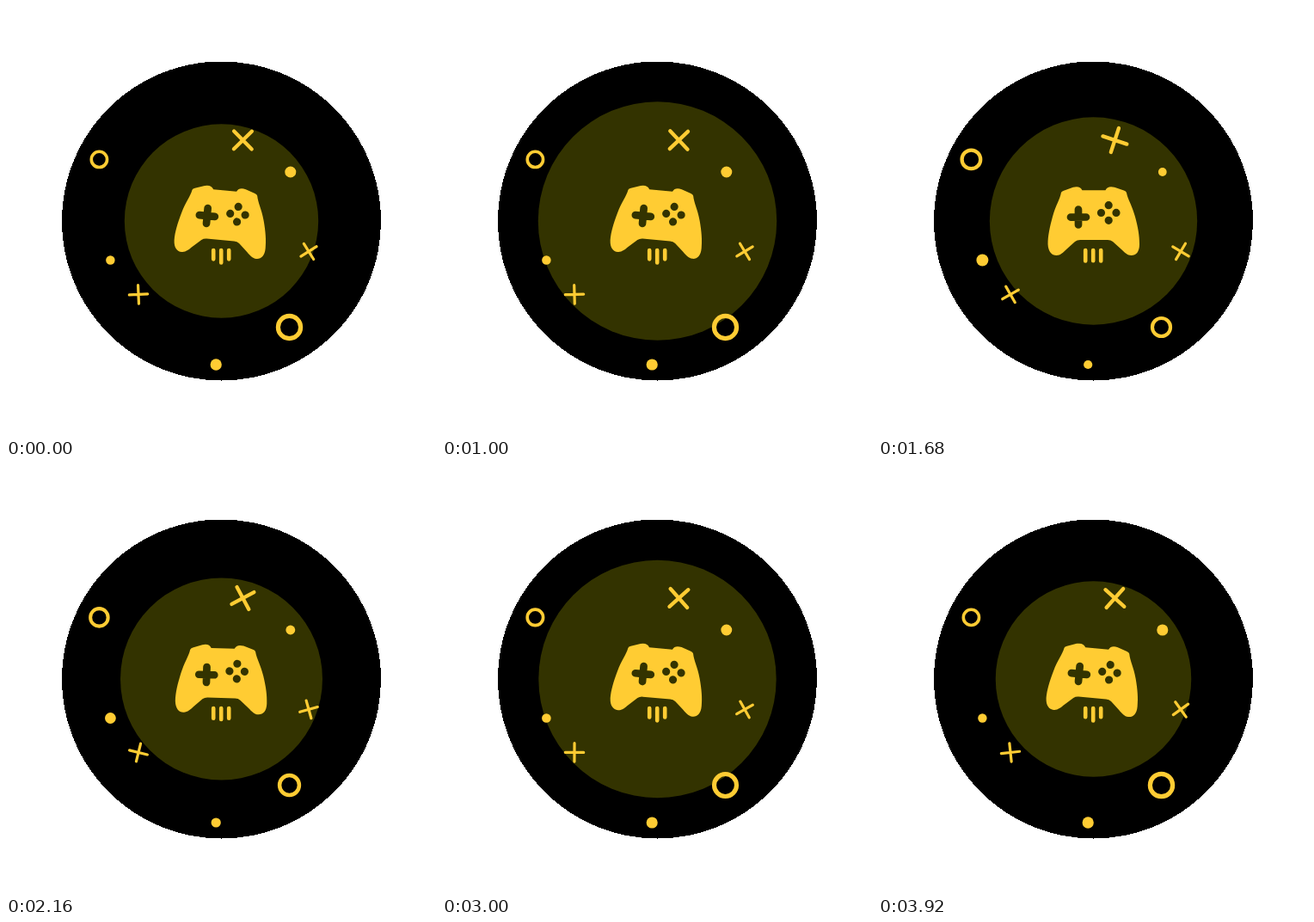
An HTML page for the animation above (3960 ms loop, 500 px wide and 500 px high).

```html
<!DOCTYPE html>
<html lang="en">
<head>
<meta charset="utf-8">
<title>Game controller</title>
<style>
  html, body { margin: 0; width: 100%; height: 100%; overflow: hidden; background: #fff; }
  svg { display: block; width: 100vw; height: 100vh; }
</style>
</head>
<body>
<svg viewBox="0 0 500 500" fill="#fc3" stroke-linecap="round">
  <circle cx="250.5" cy="250" r="185.5" fill="#000" shape-rendering="crispEdges"/>
  <circle id="pulse" cx="250.5" cy="250" r="112.7" fill="#330"/>
  <g id="pad">
    <path d="M213 217Q213.5 215.5 216 214.6L227 210.8Q235 208.8 237.5 214.3H264.500Q267 208.8 275 210.8
      L286 214.6Q288.5 215.5 289 217C290.5 225 295.5 232 299 245C302.5 258 304 267 304 277C304 286 300 290 294.5 290
      C290 290 286.5 286.5 283 283L273 274Q270.5 272 267 272H235Q231.5 272 229 274L219 283
      C215.5 286.5 212 290 207.5 290C202 290 198 286 197.5 277C197.500 267 199.500 258 203 245C206.500 232 211.500 225 213 217Z"/>
    <path d="M224 245.500h18M233 236.500v18" stroke="#330" stroke-width="8.700"/>
    <g fill="#330">
      <circle cx="268.200" cy="231.700" r="4.600"/>
      <circle cx="259.500" cy="240.500" r="4.600"/>
      <circle cx="277" cy="240.500" r="4.600"/>
      <circle cx="268.200" cy="249.300" r="4.600"/>
    </g>
  </g>
  <path id="stripes" stroke="#fc3" stroke-width="4.600"/>
  <g id="parts" stroke="#fc3"></g>
</svg>
<script>
const LOOP = 3960, BEAT = LOOP / 4, STEP = 40, LEAD = 30;
const $ = id => document.getElementById(id);

function add(tag, attrs) {
  const el = document.createElementNS('http://www.w3.org/2000/svg', tag);
  for (const key in attrs) el.setAttribute(key, attrs[key]);
  return $('parts').appendChild(el);
}

// x, y, mean outer radius, swing, ring or dot
const rounds = [
  [108.4, 178.4, 12.7, -1.8, true],
  [329.5, 373.5, 13, 2.75, true],
  [330.8, 193, 5.1, 1.45, false],
  [244.2, 417, 5.3, 1.35, false],
  [121.4, 295.5, 6.75, -1.55, false]
].map(([x, y, mean, swing, ring]) => ({
  x, y, mean, swing,
  el: add('circle', ring
    ? { r: 0.835, fill: 'none', 'stroke-width': 0.33 }
    : { r: 1, stroke: 'none' })
}));

// x, y, arm length, line width, starting angle
const crosses = [
  [275.4, 156, 14.7, 4.3, 45.5],
  [352, 285.4, 10.7, 3.2, -32],
  [154, 335.4, 10.7, 3.2, -2.5]
].map(([x, y, arm, width, angle]) => ({
  x, y, angle,
  el: add('path', { d: `M${-arm} 0H${arm}M0 ${-arm}V${arm}`, 'stroke-width': width })
}));

function draw(t) {
  const wave = Math.cos((t + LEAD) / BEAT * 2 * Math.PI);
  const grow = 1 - Math.abs(1 - t / BEAT % 2);
  $('pulse').setAttribute('r', 112.7 + 26.3 * grow);
  $('pad').setAttribute('transform', `rotate(${0.6 + 4.7 * wave} 250 254)`);

  const side = 296.2 - 1.9 * wave, middle = 296.5 + 2 * wave;
  $('stripes').setAttribute('d', `M241.2 284V${side}M250.2 284V${middle}M259.2 284V${side}`);

  for (const { x, y, mean, swing, el } of rounds)
    el.setAttribute('transform', `translate(${x} ${y}) scale(${mean + swing * wave})`);
  for (const { x, y, angle, el } of crosses)
    el.setAttribute('transform', `translate(${x} ${y}) rotate(${angle + 360 * t / LOOP})`);
}

function tick() {
  const t = performance.now() % LOOP;
  draw(Math.floor(t / STEP) * STEP);
  requestAnimationFrame(tick);
}
tick();
</script>
</body>
</html>
```
